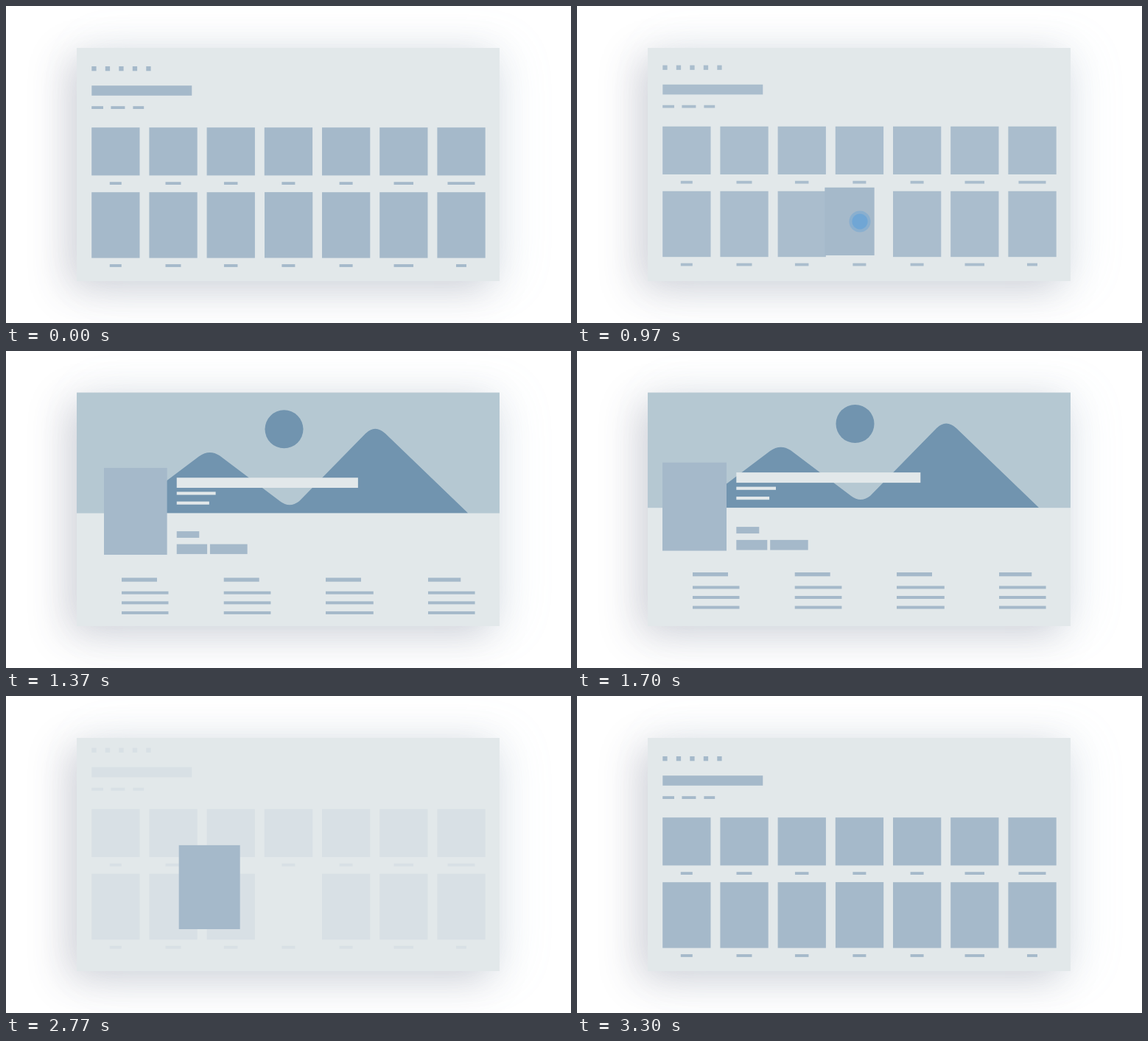
These frames come from a looping animation (767 by 431 pixels, 4.13 s). An HTML page with a canvas:

```html
<!DOCTYPE html>
<html lang="en">
<head>
<meta charset="utf-8">
<title>Poster transition</title>
<style>
  html, body { margin: 0; width: 100%; height: 100%; overflow: hidden; background: #fff; }
  .card {
    position: absolute; left: 96px; top: 57px; width: 574px; height: 316.5px; background: #e2e8ea;
    box-shadow: -14px 12px 50px rgba(62, 64, 90, .22), 14px 2px 60px rgba(150, 190, 215, .12);
  }
  canvas { position: absolute; left: 0; top: 0; }
</style>
</head>
<body>
<div class="card"></div>
<canvas width="767" height="431"></canvas>
<script>
const ctx = document.querySelector('canvas').getContext('2d');
const LOOP = 4130;
const BLUE = '#a5b9ca', PALE = '#e2e8ea', SKY = '#b5c8d2', HILL = '#7194af';
const LABELS = [16, 21, 18.5, 18, 18, 26.5, 37];
const RISE = 101.5;
const hills = new Path2D('M160 213L262 136Q276 126 290 135L372 197Q385 207 398 197L488 105Q501 92 515 105L627 213Z');

const mix = (a, b, k) => a + (b - a) * k;
const ramp = (t, from, to) => Math.min(1, Math.max(0, (t - from) / (to - from)));
const smooth = k => k * k * (3 - 2 * k);

// Cubic bezier easing with control points (x1, 0) and (x2, 1)
function ease(x, x1, x2) {
  let lo = 0, hi = 1;
  for (let i = 0; i < 24; i++) {
    const s = (lo + hi) / 2, r = 1 - s;
    if (3 * r * r * s * x1 + 3 * r * s * s * x2 + s ** 3 < x) lo = s; else hi = s;
  }
  return smooth(lo);
}

function rect(x, y, w, h, color = BLUE) {
  ctx.fillStyle = color;
  ctx.fillRect(x, y, w, h);
}

function disc(x, y, r, color) {
  ctx.fillStyle = color;
  ctx.beginPath();
  ctx.arc(x, y, r, 0, 7);
  ctx.fill();
}

function layer(alpha, dx, dy, draw) {
  if (alpha <= 0) return;
  ctx.save();
  ctx.globalAlpha = alpha;
  ctx.translate(dx, dy);
  draw();
  ctx.restore();
}

function drawGrid() {
  for (let i = 0; i < 5; i++) rect(116.3 + i * 18.5, 82, 6.3, 6.3);
  rect(116.3, 108.2, 136, 13.6);
  for (const [x, w] of [[116.2, 15.8], [142.4, 19], [172.4, 14.8]]) rect(x, 136.2, w, 3.8);
  LABELS.forEach((w, i) => {
    const x = 116.2 + i * 78.2, mid = x + 32.6, low = i === 6 ? 14 : w;
    rect(x, 165.2, 65.3, 65.2);
    if (i !== 3) rect(x, 253.2, 65.3, 89.4);
    rect(mid - w / 2, 239.2, w, 3.8);
    rect(mid - low / 2, 351.1, low, 3.8);
  });
}

function drawHero(alpha) {
  rect(96, -60, 574, 273.2, SKY);
  // Opaque tint keeps the hills from doubling up with the sky while fading
  ctx.globalAlpha = 1;
  const tone = [[0xe2, 0x71], [0xe8, 0x94], [0xea, 0xaf]].map(([a, b]) => Math.round(mix(a, b, alpha)));
  ctx.fillStyle = `rgb(${tone})`;
  ctx.fill(hills);
  disc(377.5, 99, 26, ctx.fillStyle);
}

function drawLists() {
  [[157, 48, 63.5], [295.7, 48, 63.7], [434, 48, 64.8], [573, 44.3, 63.6]].forEach(([x, head, line]) => {
    rect(x, 301, head, 5.3);
    for (let i = 0; i < 3; i++) rect(x, 319.4 + i * 13.6, line, 4);
  });
}

function drawText() {
  rect(100.3, 13.5, 250, 14, PALE);
  rect(100.3, 33, 53.7, 4.2, PALE);
  rect(100.3, 46.4, 44.8, 4.2, PALE);
  rect(100.3, 87.5, 31, 9);
  rect(100.3, 105.3, 42, 13.7);
  rect(146.2, 105.3, 51.5, 13.7);
}

function drawTouch(t) {
  const move = smooth(ramp(t, 200, 720)), press = smooth(ramp(t, 700, 980));
  const r = mix(24, 14.5, press);
  layer(ramp(t, 160, 300) * (1 - ramp(t, 970, 1080)), mix(496, 384, move), 293, () => {
    disc(0, 0, r, 'rgba(96,160,215,.4)');
    disc(0, 0, r * .73, 'rgba(90,160,218,.55)');
  });
}

function draw(t) {
  const back = ease(ramp(t, 2580, 3320), .3, .05);
  const open = t < 2500 ? ease(ramp(t, 932, 1672), .15, 0) : 1 - back;
  const scale = t < 2500
    ? mix(.75, 1, open ** .85)
    : 1 + .013 * Math.min(1, 50 * back) * (1 - back) - .25 * back ** 2.3;
  const gridAlpha = 1 - ramp(t, 960, 1090) + ramp(t, 2748, 2898);
  const detailAlpha = ramp(t, 1085, 1235) - ramp(t, 2612, 2745);
  const drop = RISE * (1 - open);

  ctx.clearRect(0, 0, 767, 431);
  ctx.save();
  ctx.beginPath();
  ctx.rect(96, 56.4, 574, 317.1);
  ctx.clip();
  layer(gridAlpha, 0, -23 * open, drawGrid);
  layer(detailAlpha, 0, drop, () => drawHero(detailAlpha));
  layer(detailAlpha, 0, drop, drawLists);
  layer(1, mix(351, 116, open), 151.6 + drop, () => {
    ctx.scale(scale, scale);
    rect(0, 0, 87, mix(119.2, 120, open));
    ctx.globalAlpha = Math.max(0, detailAlpha);
    drawText();
  });
  drawTouch(t);
  ctx.restore();
}

const start = performance.now();
function tick() {
  draw((performance.now() - start) % LOOP);
  requestAnimationFrame(tick);
}
tick();
</script>
</body>
</html>
```
